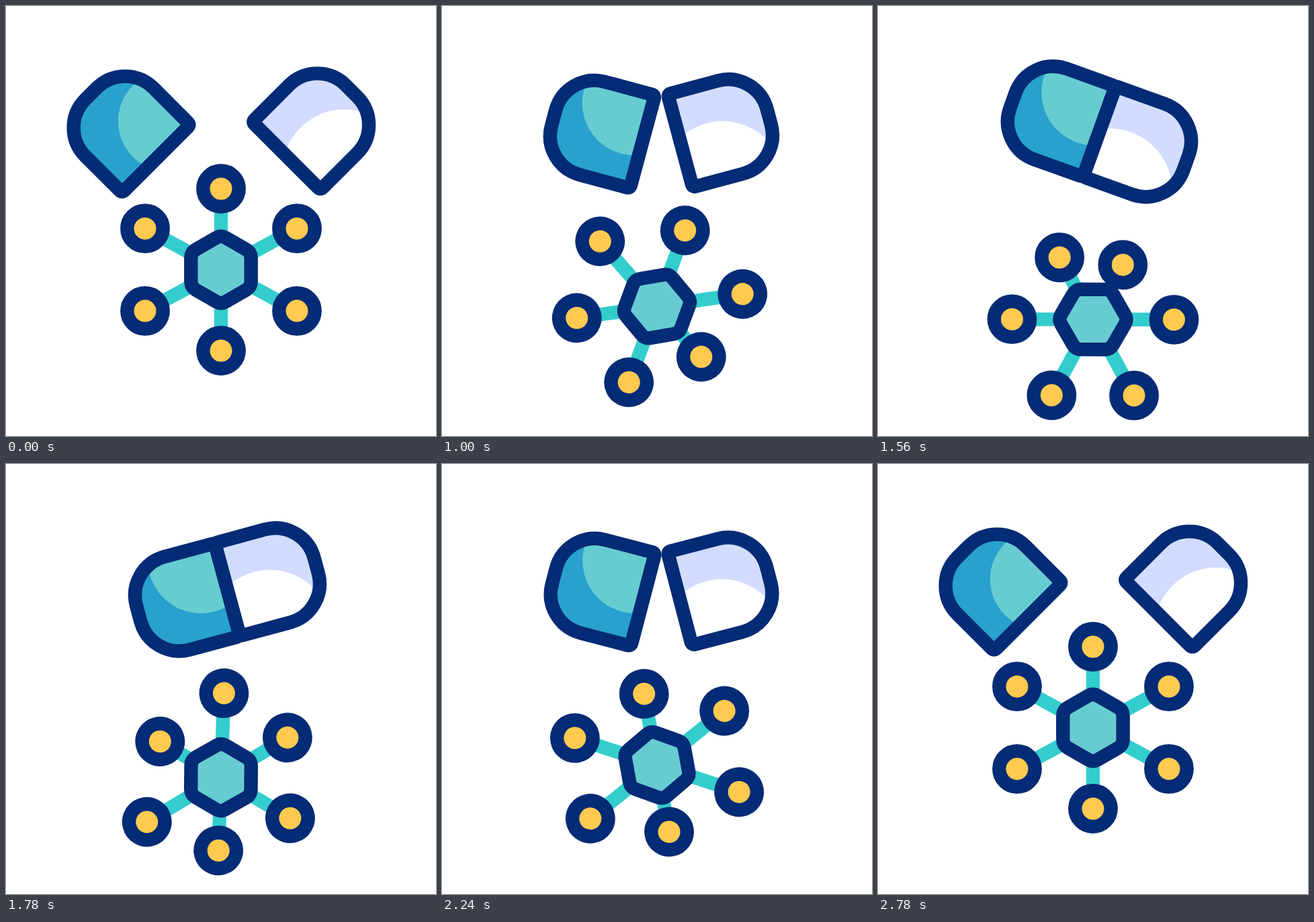
An HTML page for the animation above (3.6 s loop, 640 px wide and 640 px high).

```html
<!DOCTYPE html>
<html lang="en">
<head>
<meta charset="utf-8">
<title>Capsule and molecule</title>
<style>
  html, body { margin: 0; width: 100%; height: 100%; overflow: hidden; background: #fff; }
  svg { display: block; width: 100%; height: 100%; }
  .ink { stroke: #042b75; stroke-width: 20.4; stroke-linejoin: round; }
  .bond { stroke: #33cdcd; stroke-width: 20.4; }
</style>
</head>
<body>
<svg viewBox="0 0 640 640">
  <defs>
    <!-- Half capsule around its own centre, flat side on the right -->
    <path id="half" d="M63.5-71.7H-8.8A59.7 59.7 0 0 0-68.5-12V12A59.7 59.7 0 0 0-8.8 71.7H63.5Q68.5 71.7 68.5 66.7V-66.7Q68.5-71.7 63.5-71.7Z"/>
    <clipPath id="leftClip"><use href="#half"/></clipPath>
    <clipPath id="rightClip"><use href="#half" transform="scale(-1 1)"/></clipPath>
  </defs>
  <g id="capsule">
    <g id="left">
      <use href="#half" fill="#28a1ce"/>
      <circle id="shine" cx="42" cy="-52.5" r="75" fill="#67ccd1" clip-path="url(#leftClip)"/>
      <use href="#half" class="ink" fill="none"/>
    </g>
    <g id="right">
      <use href="#half" transform="scale(-1 1)" fill="#d2dcfe"/>
      <circle cx="-24" cy="77.5" r="92.5" fill="#fff" clip-path="url(#rightClip)"/>
      <use href="#half" transform="scale(-1 1)" class="ink" fill="none"/>
    </g>
  </g>
  <g id="molecule">
    <g id="bonds"></g>
    <path id="core" class="ink" fill="#67ccd1"/>
    <g id="atoms"></g>
  </g>
</svg>
<script>
const LOOP = 3600;
const RETRACT = 36;
const $ = id => document.getElementById(id);

// Keyframes as [time, value], eased in and out between neighbours
const closing = [[600, 0], [1255, 1], [1993, 1], [2643, 0]];
const tilting = [[1300, 0], [1500, 30], [1710, -20], [1930, 0]];
const sinking = [[600, 392.5], [1204, 466.5], [2044, 466.5], [2648, 392.5]];
const spinning = [[600, 0], [2520, 180]];

// Each atom: direction, resting distance, start and half length of its inward pulse
const atoms = [
  [0, 120.5, 1747, 335],
  [61.5, 128.6, 1600, 340],
  [118.5, 128.6, 686, 443],
  [180, 120.5, 1602, 400],
  [241.5, 128.6, 843, 516],
  [298.5, 128.6, 1182, 377]
].map(([angle, reach, start, half]) => ({
  angle, reach,
  pulse: [[start, 0], [start + half, RETRACT], [start + 2 * half, 0]],
  bond: add('bonds', 'line', { class: 'bond' }),
  ball: add('atoms', 'circle', { class: 'ink', r: 26.7, fill: '#ffca4f' })
}));

function add(parent, tag, attrs) {
  const node = document.createElementNS('http://www.w3.org/2000/svg', tag);
  set(node, attrs);
  return $(parent).appendChild(node);
}

function set(node, attrs) {
  for (const key in attrs) node.setAttribute(key, attrs[key]);
}

function polar(angle, radius) {
  const a = angle * Math.PI / 180;
  return [radius * Math.sin(a), -radius * Math.cos(a)];
}

function mix(a, b, k) {
  return a + (b - a) * k;
}

function valueAt(keys, time) {
  if (time <= keys[0][0]) return keys[0][1];
  for (let i = 1; i < keys.length; i++) {
    const [t0, v0] = keys[i - 1], [t1, v1] = keys[i];
    if (time < t1) {
      const s = (time - t0) / (t1 - t0);
      return mix(v0, v1, s * s * (3 - 2 * s));
    }
  }
  return keys[keys.length - 1][1];
}

// Hexagon with slightly softened corners
function hexagon(radius, trim) {
  let d = '';
  for (let i = 0; i < 6; i++) {
    const [before, tip, after] = [-1, 0, 1].map(k => polar((i + k) * 60, radius));
    const toward = p => tip.map((v, j) => mix(v, p[j], trim / radius));
    d += `${i ? 'L' : 'M'}${toward(before)}Q${tip} ${toward(after)}`;
  }
  return d + 'Z';
}

function place(id, x, y, angle) {
  set($(id), { transform: `translate(${x} ${y}) rotate(${angle})` });
}

function draw(time) {
  const shut = valueAt(closing, time);
  place('left', mix(175, 261, shut), mix(179, 187, shut), 45 * (1 - shut));
  place('right', mix(465.7, 398, shut), mix(174.8, 186.8, shut), -45 * (1 - shut));
  set($('shine'), { r: mix(75, 79, shut) });
  set($('capsule'), { transform: `rotate(${valueAt(tilting, time)} 329.5 187)` });

  place('molecule', 320, valueAt(sinking, time), valueAt(spinning, time));
  for (const { angle, reach, pulse, bond, ball } of atoms) {
    const [x, y] = polar(angle, reach - valueAt(pulse, time));
    set(bond, { x2: x, y2: y });
    set(ball, { cx: x, cy: y });
  }
}

set($('core'), { d: hexagon(51.6, 8) });

const begin = performance.now();
function tick() {
  draw((performance.now() - begin) % LOOP);
  requestAnimationFrame(tick);
}
tick();
</script>
</body>
</html>
```
